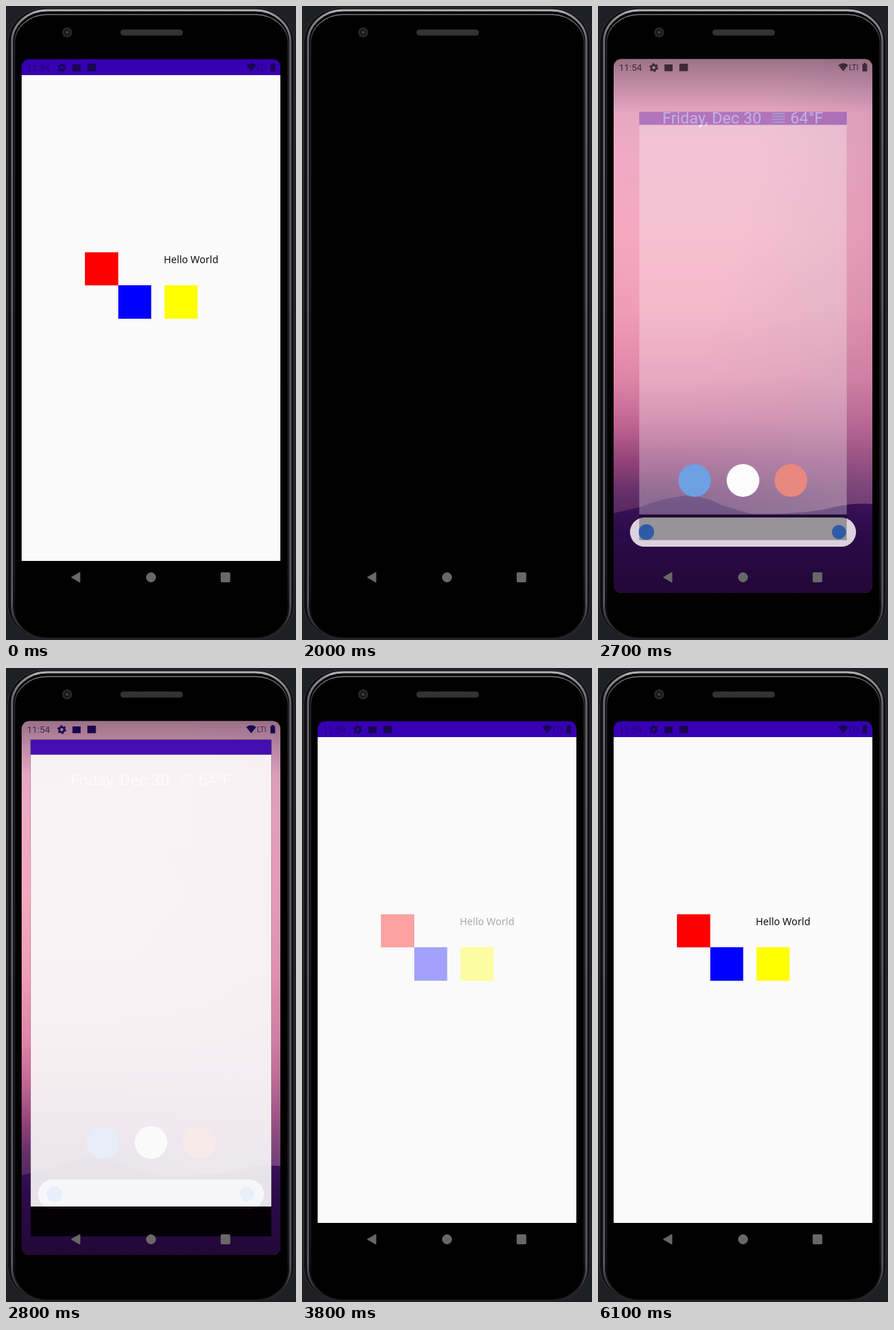
Animation of 408x890 px, one loop 6.3 s. Source, as an HTML page:

```html
<!DOCTYPE html>
<html lang="en">
<head>
<meta charset="utf-8">
<title>Phone launch</title>
<style>
html, body { margin: 0; width: 100%; height: 100%; overflow: hidden; background: #1f2026; }
svg { display: block; width: 408px; height: 890px; }
text { font-family: Roboto, sans-serif; }
.hello { font: 14px "Noto Sans", sans-serif; fill: #111; }
.date { font-size: 22.6px; fill: #fff; }
#status { color: #3c2a36; }
#status.app { color: #180650; }
#status.app text { opacity: .72; }
</style>
</head>
<body>
<svg viewBox="0 0 408 890">
  <defs>
    <linearGradient id="rim" x2="0" y2="1">
      <stop offset="0" stop-color="#b0b0b4"/>
      <stop offset=".012" stop-color="#8c8c90"/>
      <stop offset=".05" stop-color="#626266"/>
      <stop offset=".5" stop-color="#58585c"/>
      <stop offset=".94" stop-color="#56565a"/>
      <stop offset="1" stop-color="#1c1c1f"/>
    </linearGradient>
    <linearGradient id="lip" x2="0" y2="1">
      <stop offset="0" stop-color="#78787c"/>
      <stop offset=".04" stop-color="#2c2c31"/>
      <stop offset=".9" stop-color="#22232a"/>
      <stop offset="1" stop-color="#050505"/>
    </linearGradient>
    <linearGradient id="sky" gradientUnits="userSpaceOnUse" x1="204" y1="75" x2="204" y2="715">
      <stop offset="0" stop-color="#dda2bd"/>
      <stop offset=".2" stop-color="#eeaac4"/>
      <stop offset=".38" stop-color="#f6a8c0"/>
      <stop offset=".55" stop-color="#f09db7"/>
      <stop offset=".7" stop-color="#e085a7"/>
      <stop offset=".8" stop-color="#c06592"/>
      <stop offset=".88" stop-color="#934379"/>
      <stop offset=".95" stop-color="#652f69"/>
      <stop offset="1" stop-color="#54295f"/>
    </linearGradient>
    <linearGradient id="haze" x1=".2" y1=".25" x2="1" y2=".7">
      <stop offset=".3" stop-color="#a07098" stop-opacity="0"/>
      <stop offset="1" stop-color="#a07098" stop-opacity=".32"/>
    </linearGradient>
    <linearGradient id="scrim" x2="0" y2="1">
      <stop offset="0" stop-color="#403040" stop-opacity=".42"/>
      <stop offset="1" stop-color="#403040" stop-opacity="0"/>
    </linearGradient>
    <linearGradient id="hill" x2="0" y2="1">
      <stop offset="0" stop-color="#3c1458"/>
      <stop offset=".4" stop-color="#2c0a4a"/>
      <stop offset="1" stop-color="#220736"/>
    </linearGradient>
    <pattern id="mesh" width="3" height="3" patternUnits="userSpaceOnUse">
      <rect width="3" height="3" fill="#424244"/>
      <path d="M0 0h1.4v1.4H0zM1.5 1.5h1.4v1.4H1.5z" fill="#202022"/>
    </pattern>
    <clipPath id="screen"><rect x="22" y="74.500" width="364" height="749.500" rx="11"/></clipPath>
  </defs>

  <rect width="408" height="890" fill="#1f2026"/>
  <rect x="2.500" y="2.500" width="402.500" height="886" rx="54" ry="48" fill="#101012" stroke="#333337"/>
  <rect x="8.500" y="6" width="391.500" height="881" rx="50" ry="44" fill="#000" stroke="url(#rim)" stroke-width="3"/>
  <rect x="12" y="12" width="385" height="874" rx="46" ry="40" fill="#000" stroke="url(#lip)" stroke-width="1.500"/>
  <circle cx="86" cy="37" r="7" fill="#29292c"/>
  <circle cx="86" cy="37" r="4.500" fill="#18181c"/>
  <circle cx="86" cy="37" r="2" fill="#40424f"/>
  <rect x="161" y="33" width="88" height="8.500" rx="4.200" fill="url(#mesh)"/>

  <g id="home" clip-path="url(#screen)">
    <rect x="22" y="74" width="364" height="750" fill="url(#sky)"/>
    <rect x="22" y="74" width="364" height="750" fill="url(#haze)"/>
    <rect x="22" y="74" width="364" height="76" fill="url(#scrim)"/>
    <path d="M22 712L60 703Q100 688 130 687Q155 690 175 701L215 713Q290 714 330 704Q360 697 386 699V824H22z" fill="url(#hill)"/>
    <text class="date" x="90.500" y="165">Friday, Dec 30</text>
    <path d="M245 151h18M245 155h18M245 159h18M245 163h18" stroke="#d8d4de" stroke-width="1.800"/>
    <text class="date" x="270.500" y="165">64°F</text>
    <circle cx="136" cy="666" r="23" fill="#3079dc"/>
    <circle cx="204" cy="666" r="23" fill="#fff"/>
    <circle cx="271.500" cy="666" r="23" fill="#e2574a"/>
    <rect x="45" y="718" width="318" height="41" rx="20.500" fill="#dcd2dd"/>
    <circle cx="68" cy="738.500" r="11" fill="#4384f0"/>
    <circle cx="339" cy="738.500" r="10" fill="#4384f0"/>
  </g>

  <g id="app" clip-path="url(#screen)">
    <g id="window">
      <rect x="22" y="74.500" width="364" height="749.500"/>
      <rect x="22" y="74.500" width="364" height="22.500" fill="#3700b3"/>
      <rect x="22" y="97" width="364" height="682" fill="#fbfbfb"/>
    </g>
    <g id="content">
      <rect x="111" y="345.700" width="47" height="46.500" fill="#f00"/>
      <rect x="158" y="392" width="46.300" height="47" fill="#00f"/>
      <rect x="223" y="392" width="46.500" height="47" fill="#ff0"/>
      <text class="hello" x="222" y="361">Hello World</text>
    </g>
  </g>

  <g id="status" fill="currentColor">
    <text x="29.500" y="91" font-size="13">11:54</text>
    <circle cx="78.500" cy="86.500" r="3.500" fill="none" stroke="currentColor" stroke-width="2.600"/>
    <circle cx="78.500" cy="86.500" r="5.300" fill="none" stroke="currentColor" stroke-width="1.800" stroke-dasharray="2.775"/>
    <rect x="93.500" y="82" width="11.500" height="9.500"/>
    <rect x="114.500" y="81" width="12" height="10.500"/>
    <path d="M338 83Q345 77.500 352 83L345 91.500z"/>
    <text x="353" y="90.300" font-size="10.500">LTI</text>
    <path d="M372 81.500h1.800V80h3v1.500h1.800v10.200H372z"/>
  </g>

  <g fill="#686868" stroke="#686868" stroke-linejoin="round">
    <path d="M92 802L104 795V809z"/>
    <circle cx="204" cy="802" r="6.500"/>
    <rect x="302.500" y="795.500" width="12.500" height="13" rx=".8"/>
  </g>
</svg>
<script>
const [home, app, win, content, status_] =
  ['home', 'app', 'window', 'content', 'status'].map(id => document.getElementById(id));

const LOOP = 6300;
// start ms, home shown, window opacity, window scale, content opacity
const steps = [
  [0, 0, 1, 1, 1],
  [2000, 0, 0, 1, 0],
  [2100, 1, 0, 1, 0],
  [2700, 1, .3, .802, 0],
  [2800, 1, .9, .93, 0],
  [2900, 1, 1, .985, 0],
  [3000, 0, 1, 1, 0],
  [3800, 0, 1, 1, .35],
  [3900, 0, 1, 1, .75],
  [4000, 0, 1, 1, 1]
];

function draw() {
  const t = performance.now() % LOOP;
  const [, back, alpha, scale, fade] = steps.findLast(s => s[0] <= t);
  home.style.opacity = back;
  app.style.opacity = alpha;
  win.setAttribute('transform', `translate(204 449.5) scale(${scale}) translate(-204 -449.5)`);
  content.style.opacity = fade;
  status_.style.opacity = back || alpha ? 1 : 0;
  status_.setAttribute('class', alpha > .5 ? 'app' : '');
  requestAnimationFrame(draw);
}
draw();
</script>
</body>
</html>
```
